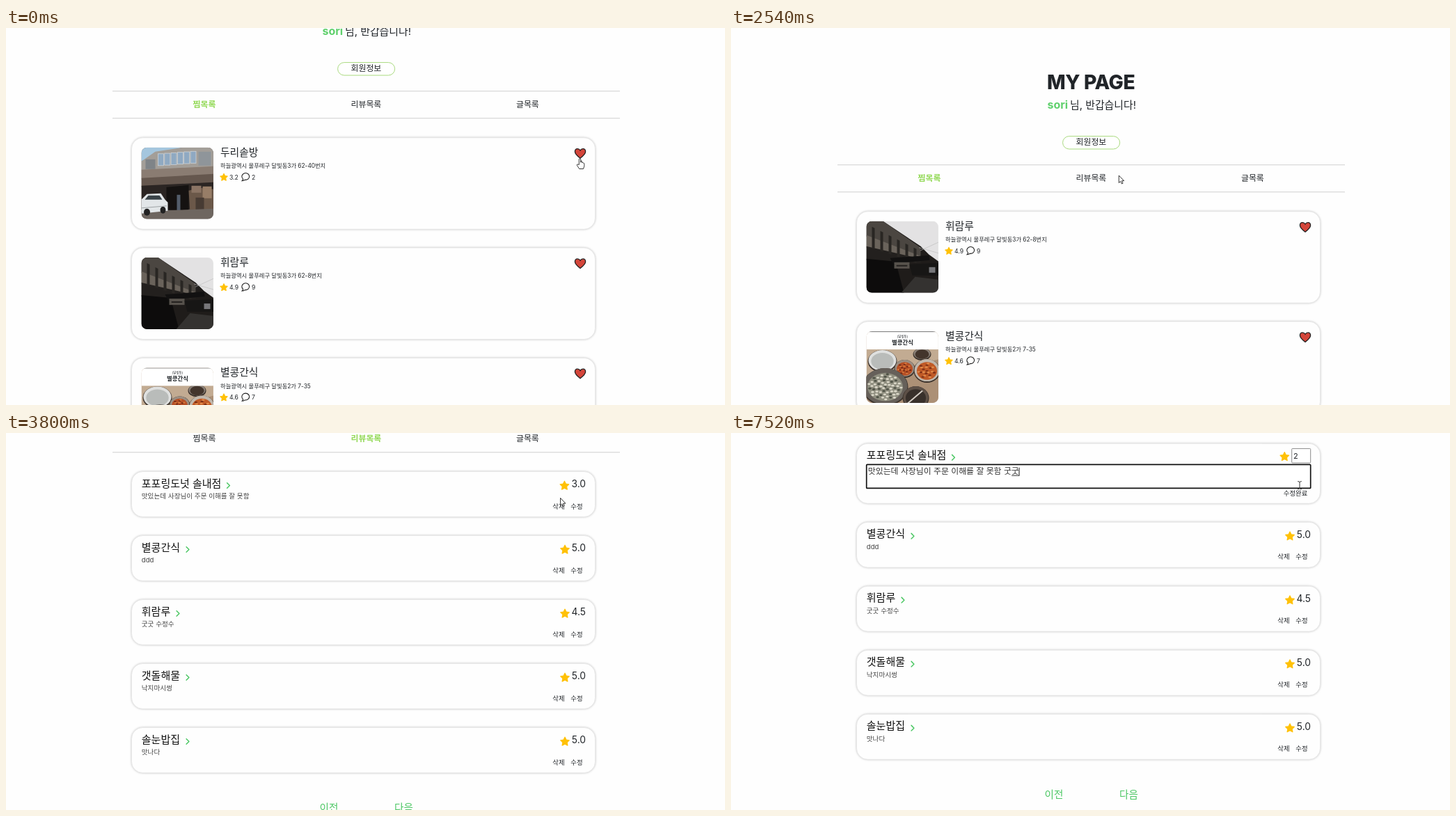
Recreate the animation shown at these times as an HTML page. Size 1033x542 px, loop 7990 ms.

```html
<!DOCTYPE html>
<html lang="ko">
<head>
<meta charset="utf-8">
<title>My page</title>
<style>
  html, body { margin: 0; width: 100%; height: 100%; overflow: hidden; background: #fefefe; }
  svg { display: block; width: 100%; height: 100%; }
  text { font-family: Inter, "Noto Sans CJK KR", "Noto Sans CJK", sans-serif; white-space: pre; }
  .card { fill: #fefefe; stroke: #e6e6e6; stroke-width: .7; filter: drop-shadow(.8px .8px 1.6px rgba(0,0,0,.25)); }
  .panel { fill: #fff; filter: drop-shadow(0 4px 6px rgba(0,0,0,.32)); }
</style>
</head>
<body>
<svg id="stage" viewBox="0 0 1033 542" xmlns="http://www.w3.org/2000/svg"></svg>
<script>
const LOOP = 7990, INK = '#212529', LIME = '#93d957', GREEN = '#4cc764', GOLD = '#ffc107';
const CARD_TOP = 263.8, LIKE_STEP = 158.3, REVIEW_STEP = 92, EDIT_EXTRA = 21;

const likes = [
  { name: '두리솥방', addr: '하늘광역시 물푸레구 달빛동3가 62-40번지', rate: '3.2', talk: 2, photo: street },
  { name: '휘람루', addr: '하늘광역시 물푸레구 달빛동3가 62-8번지', rate: '4.9', talk: 9, photo: alley },
  { name: '별콩간식', addr: '하늘광역시 물푸레구 달빛동2가 7-35', rate: '4.6', talk: 7, photo: food }
];
const reviews = [
  { name: '포포링도넛 솔내점', body: '맛있는데 사장님이 주문 이해를 잘 못함', rate: '3.0', arrow: 317 },
  { name: '별콩간식', body: 'ddd', rate: '5.0', arrow: 258.5 },
  { name: '휘람루', body: '굿굿 수정수', rate: '4.5', arrow: 244.5 },
  { name: '갯돌해물', body: '낙지마시썽', rate: '5.0', arrow: 258.5 },
  { name: '솔눈밥집', body: '맛나다', rate: '5.0', arrow: 258.5 }
];

// Markup helpers
const text = (x, y, s, size, o = {}) =>
  `<text x="${x}" y="${y}" font-size="${size}" fill="${o.fill || INK}" font-weight="${o.weight || 400}"` +
  ` text-anchor="${o.anchor || 'start'}" letter-spacing="${(o.track || 0) * size}"${o.id ? ` id="${o.id}"` : ''}>${s}</text>`;
const rect = (x, y, w, h, attrs) => `<rect x="${x}" y="${y}" width="${w}" height="${h}" ${attrs}/>`;
const shape = (points, fill) => `<polygon points="${points}" fill="${fill}"/>`;
const oval = (x, y, rx, ry, fill) => `<ellipse cx="${x}" cy="${y}" rx="${rx}" ry="${ry}" fill="${fill}"/>`;
const line = (d, color, width) =>
  `<path d="${d}" fill="none" stroke="${color}" stroke-width="${width}" stroke-linecap="round" stroke-linejoin="round"/>`;
const group = (id, inner) => `<g id="${id}">${inner}</g>`;

function star(x, y, r) {
  const pts = [];
  for (let i = 0; i < 10; i++) {
    const a = i * Math.PI / 5 - Math.PI / 2, k = i % 2 ? r * .5 : r;
    pts.push((x + k * Math.cos(a)).toFixed(2) + ',' + (y + k * Math.sin(a)).toFixed(2));
  }
  return `<polygon points="${pts.join(' ')}" fill="${GOLD}" stroke="${GOLD}" stroke-width="1.2" stroke-linejoin="round"/>`;
}

const heart = (x, y) =>
  `<path transform="translate(${x} ${y})" fill="#d4453a" stroke="#222" stroke-width="1.3"
    d="M0 7C-3 4.6-7.6 1.2-7.6-2.5-7.6-4.9-6-6.6-3.9-6.6-2.2-6.6-.8-5.7 0-4.2.8-5.7 2.2-6.6 3.9-6.6 6-6.6 7.6-4.9 7.6-2.5 7.6 1.2 3 4.6 0 7Z"/>`;

// Photos, drawn in a 104 x 103 box
function street() {
  let s = rect(0, 0, 104, 103, 'fill="#57504a"') + shape('0,0 60,0 20,9 0,20', '#a4c6de') +
    shape('0,20 20,6 60,0 104,0 104,38 0,44', '#a39e98') + shape('0,32 104,27 104,40 0,46', '#8a7c72') +
    shape('0,44 104,38 104,52 0,57', '#65574e') + shape('0,55 104,50 104,88 0,90', '#2b2523');
  for (let i = 0; i < 6; i++) s += rect(24 + i * 9.3, 9 - i * .7, 8, 17, 'fill="#8fa9c2" stroke="#ccd3d8" stroke-width=".8"');
  return s + rect(6, 17, 14, 14, 'fill="#7f8488"') + rect(82, 6, 18, 20, 'fill="#8f959a"') +
    shape('36,57 68,54 68,90 36,90', '#151211') + rect(51, 68, 5, 24, 'fill="#535d6b"') +
    shape('68,62 84,58 104,60 104,92 70,94', '#6b5849') + rect(72, 55, 14, 10, 'fill="#8b7464"') +
    rect(88, 56, 13, 17, 'fill="#977d67"') + rect(78, 72, 12, 20, 'fill="#473b33"') +
    shape('0,92 104,88 104,103 0,103', '#6e6660') +
    shape('0,75 8,67 28,66 34,75 38,79 38,91 0,95', '#e2e6e8') + shape('5,75 10,69 26,69 30,75', '#3a4348') +
    oval(8, 93, 4.5, 5, '#222') + oval(31, 90, 4, 5, '#222') + line('M0 87L36 84', '#9fa4a6', 1);
}
function alley() {
  let s = rect(0, 0, 104, 103, 'fill="#e3e2e3"') + shape('0,0 24,0 78,36 90,48 104,58 104,103 0,103', '#1f1c1a') +
    shape('0,0 24,0 78,38 78,50 0,22', '#4b4641') + shape('0,20 78,50 78,56 0,38', '#6a635b') +
    shape('0,36 78,54 78,60 0,56', '#23201e');
  for (let i = 0; i < 6; i++) s += shape(`${8 + i * 12},${8 + i * 6} ${12 + i * 12},${10 + i * 6} ${12 + i * 12},${40 + i * 4} ${8 + i * 12},${39 + i * 4}`, '#292623');
  return s + shape('0,54 42,58 54,103 0,103', '#0d0c0c') + shape('34,53 90,49 91,56 38,61', '#121111') +
    rect(40, 59, 22, 9, 'fill="#57524c"') + line('M44 64H58', '#24211f', 2) +
    shape('50,103 70,80 104,84 104,103', '#343230') + shape('62,62 104,60 104,78 66,78', '#171615') +
    line('M78 42L104 30M76 38L104 46', '#b9b9b9', .6) + rect(90, 66, 9, 8, 'fill="#77777a"');
}
function food() {
  const bowl = (x, y, rx, ry, rim, fill) => oval(x, y, rx, ry, '#3b322c') + oval(x, y - 1, rx - 1, ry - 1, rim) + oval(x, y, rx * .77, ry * .75, fill);
  let s = rect(0, 0, 104, 104, 'fill="#c2ab92"') + shape('0,68 104,40 104,104 0,104', '#ac9076') +
    bowl(80, 33, 13, 9, '#8b8178', '#43352c') + bowl(23, 43, 21, 16, '#dfe0df', '#b9bcba') +
    bowl(55, 54, 15, 13, '#9b8e82', '#b64f25') + bowl(87, 57, 19, 17, '#c1b7ac', '#c05a27') +
    bowl(27, 80, 33, 27, '#66605a', '#8f8e7f') + bowl(71, 96, 19, 17, '#5d5047', '#38302b');
  for (let i = 0; i < 60; i++) {
    const r = Math.sqrt(i / 60), x = Math.cos(i * 2.4) * r, y = Math.sin(i * 2.4) * r;
    s += oval(27 + 24 * x, 80 + 19 * y, 2.2, 1.4, i % 3 ? '#dad7c8' : '#4f5246');
    if (i % 3 === 0) s += oval(87 + 13 * x, 57 + 11 * y, 2.2, 1.2, i % 2 ? '#e08a4a' : '#7d2f16') +
      oval(55 + 10 * x, 54 + 8 * y, 1.8, 1.1, i % 2 ? '#d97a3c' : '#742a15');
  }
  return s + line('M60 103L80 86', '#d3ccc4', 2) + rect(0, 0, 104, 26, 'fill="#fff"') + rect(0, 0, 104, 1, 'fill="#777"') +
    text(52, 8.5, '(달빛동)', 4.6, { anchor: 'middle' }) +
    text(52, 19, '별콩간식', 8.4, { anchor: 'middle', weight: 700 });
}

function likeCard(c, i) {
  return group('like' + i,
    rect(180.5, 0, 666, 131.4, 'rx="16" class="card"') +
    `<g transform="translate(194.5 14)" clip-path="url(#round)">${c.photo()}</g>` +
    text(308, 26, c.name, 14.8, { weight: 300 }) +
    text(308, 43.2, c.addr, 8.3) +
    star(313, 57, 5.4) + text(321, 60, c.rate, 8.6) +
    `<path transform="translate(344 56)" fill="none" stroke="#222" stroke-width="1.1" d="M-3.4 3.3A5.4 4.9 0 1 1 -.6 4.5Q-2.6 5.9-4.8 5.9-3.4 4.7-3.4 3.3Z"/>` +
    text(353, 60, c.talk, 8.6) + heart(825, 22.4));
}

function reviewCard(c, i) {
  const view = text(194.8, 38.6, c.body, 9.6, { fill: '#444' }) +
    star(i ? 803 : 802.4, 20.3, 6.6) + text(833, 22.6, c.rate, 13.8, { anchor: 'end' }) +
    text(785.3, 53, '삭제', 9.4) + text(811.3, 53, '수정', 9.4);
  return group('review' + i,
    rect(180.5, 0, 666, 65, `rx="16" class="card" id="box${i}"`) +
    text(194.8, 22, c.name, 15, { fill: '#111' }) +
    line(`M${c.arrow + .6} 16.2l3.8 3.8-3.8 3.8`, GREEN, 1.5) +
    group('view' + i, view) + (i ? '' : group('edit', editForm())));
}

function editForm() {
  return star(795.3, 19, 6.6) +
    rect(805.7, 7.2, 27, 20.6, 'id="rateBox" fill="#fff" rx="1"') +
    group('spin', rect(822, 11.5, 9.5, 13, 'fill="#e6e6e6"') + shape('824.5,16.5 826.8,13.5 829.1,16.5', '#555') + shape('824.5,19.5 826.8,22.5 829.1,19.5', '#555')) +
    text(808, 22, '3.0', 11, { id: 'rate' }) +
    '<path id="rateCaret" d="M815.6 12.5v11.5" stroke="#222" stroke-width=".8"/>' +
    rect(194.7, 30.2, 638, 34, 'id="noteBox" fill="#fff" rx="1"') +
    text(196.8, 44.2, '', 11.9, { id: 'note', fill: '#333' }) +
    '<path id="noteCaret" stroke="#111"/><path id="compose" stroke="#333"/>' +
    text(793.8, 75, '수정완료', 9.4);
}

const tab = (id, x, s) => text(x, 220, s, 11.9, { id, anchor: 'middle' });
const header =
  text(517.2, 87.5, 'MY PAGE', 28.3, { weight: 800, anchor: 'middle', track: -.015 }) +
  text(454.5, 116.3, 'sori', 16, { weight: 700, fill: '#5fd06c' }) +
  text(487, 116.1, '님, 반갑습니다!', 14.9) +
  rect(476.6, 155.6, 82, 18.4, 'rx="9.2" fill="#fff" stroke="#a9da7e"') +
  text(517.4, 168.4, '회원정보', 11.9, { anchor: 'middle' }) +
  rect(153, 196, 729, 1.4, 'fill="#dcdcdc"') + rect(153, 235, 729, 1.4, 'fill="#dcdcdc"') +
  tab('tabLike', 285, '찜목록') + tab('tabReview', 517.4, '리뷰목록') + tab('tabPost', 749.4, '글목록');

const dialog = rect(364, -40, 305.5, 132.8, 'rx="8" class="panel"') +
  text(379.5, 13.6, '내용:', 12, { weight: 700 }) +
  text(379.5, 36.3, '찜 목록에서 삭제되었습니다.', 10.5, { fill: '#858585', track: .03 }) +
  rect(605.3, 51.4, 49.2, 26, 'rx="2" fill="#0aac8f"') +
  text(630, 68.6, '확인', 11, { fill: '#fff', weight: 700, anchor: 'middle' });

const pointer = 'fill="#fff" stroke="#222" stroke-width=".9" stroke-linejoin="round"';
const cursors =
  '<circle id="glow" cx="-2" cy="1" r="8.6" fill="#eee62a" fill-opacity=".78"/>' +
  group('arrow', `<path ${pointer} d="M0 0V10.6L2.4 8.4 4.1 12 5.8 11.2 4.2 7.7H7.4Z"/>`) +
  group('hand', `<path ${pointer} d="M-1.2 8.5V1Q-1.2-.3 0-.3T1.2 1V5.2Q2-.1 3.2 5.6 4.6 4.8 5 6.2 6.3 5.8 6.3 7.4V10.5L5 14.5H-.8L-4.2 9.3Q-4.4 7.6-2.8 8Z"/>`) +
  group('beam', line('M-2.4-5.4Q0-5.4 0-4.2 0-5.4 2.4-5.4M0-4.2V4.6M-2.4 5.6Q0 5.6 0 4.4 0 5.6 2.4 5.6', '#333', 1));

document.getElementById('stage').innerHTML =
  '<defs><clipPath id="round"><rect width="103.4" height="102.8" rx="8"/></clipPath></defs>' +
  group('page', header + group('likeList', likes.map(likeCard).join('')) +
    group('reviewList', reviews.map(reviewCard).join('') +
      group('pager', text(450.5, 0, '이전', 14.6, { fill: GREEN }) + text(558, 0, '다음', 14.6, { fill: GREEN })))) +
  group('dialog', dialog) + group('cursor', cursors);

const el = {};
document.querySelectorAll('[id]').forEach(n => el[n.id] = n);
const show = (id, on) => el[id].setAttribute('display', on ? 'inline' : 'none');
const move = (id, x, y) => el[id].setAttribute('transform', `translate(${x} ${y})`);
const set = (id, attrs) => { for (const k in attrs) el[id].setAttribute(k, attrs[k]); };

// Motion: [time, values...]
const scrollKeys = [[0, 106], [2129, 106], [2130, 0], [2990, 0], [3400, 91.7], [3730, 190], [3960, 248.3]];
const cursorKeys = [
  [260, 824.5, 188], [460, 493, 84], [1270, 493, 84], [1540, 641.5, 63.5], [2130, 641.5, 63.5],
  [2540, 557.5, 212], [2690, 524, 214], [2990, 524, 214], [3400, 685, 161], [3730, 786, 104],
  [4000, 826, 64], [4560, 827, 64], [4820, 828, 36.5], [6250, 828, 36.5], [6370, 817, 73], [6850, 817, 73], [7250, 817, 75]
];
const shapes = [[0, 'hand'], [300, 'arrow'], [2600, 'hand'], [3050, 'arrow'], [4000, 'hand'], [4280, 'beam'], [4690, 'arrow'], [6310, 'beam']];
const typed = [[0, ''], [6850, ' '], [6950, ' ㄱ'], [7050, ' 구'], [7150, ' 굿'], [7250, ' 굿ㄱ'], [7390, ' 굿구'], [7520, ' 굿굿']];
const rates = [[0, '3.0'], [5080, '2.5'], [5480, '2']];
const presses = [[5020, 5210], [5420, 5640], [6040, 6100]];

const latest = (keys, t) => keys.filter(k => k[0] <= t).pop()[1];
function track(keys, t) {
  let i = 0;
  while (i < keys.length - 1 && keys[i + 1][0] <= t) i++;
  const a = keys[i], b = keys[i + 1] || a;
  const p = b === a ? 0 : Math.max(0, (t - a[0]) / (b[0] - a[0]));
  return a.slice(1).map((v, n) => v + (b[n + 1] - v) * p);
}
const outline = (id, on) => set(id, { stroke: on ? '#111' : '#8a8a8a', 'stroke-width': on ? 1.7 : 1 });

function drawEdit(t) {
  const rateOn = t >= 5020 && t < 6510, noteOn = t >= 6510, extra = latest(typed, t);
  outline('rateBox', rateOn);
  outline('noteBox', noteOn);
  show('spin', t >= 4760 && t < 6310);
  el.rate.textContent = latest(rates, t);
  show('rateCaret', rateOn && t >= 5480);
  el.note.textContent = reviews[0].body + extra;
  show('noteCaret', noteOn);
  show('compose', extra.length > 1);
  if (noteOn) {
    const x = 197 + el.note.getComputedTextLength();
    set('noteCaret', { d: `M${x} 34.5V46.5` });
    set('compose', { d: `M${x - 10.8} 46H${x}` });
  }
}

function draw(t) {
  const removed = t >= 2130, onReviews = t >= 2800, editing = t >= 4280;
  move('page', 0, -track(scrollKeys, t)[0]);
  show('likeList', !onReviews);
  show('reviewList', onReviews);
  show('like0', !removed);
  likes.forEach((_, i) => move('like' + i, 0, CARD_TOP + (i - removed) * LIKE_STEP));
  [['tabLike', !onReviews], ['tabReview', onReviews]].forEach(([id, on]) =>
    set(id, { fill: on ? LIME : INK, 'font-weight': on ? 700 : 400 }));

  const extra = editing ? EDIT_EXTRA : 0;
  reviews.forEach((_, i) => move('review' + i, 0, CARD_TOP - .3 + i * REVIEW_STEP + (i ? extra : 0)));
  set('box0', { height: 65 + extra });
  move('pager', 0, CARD_TOP + 4 * REVIEW_STEP + 120.5 + extra);
  show('view0', !editing);
  show('edit', editing);
  if (editing) drawEdit(t);

  const p = Math.min(1, Math.max(0, (t - 850) / 220));
  show('dialog', t >= 850 && t < 1800);
  move('dialog', 0, -115 * (1 - p) ** 2);
  set('dialog', { opacity: Math.min(1, .3 + p) });

  move('cursor', ...track(cursorKeys, t));
  const kind = latest(shapes, t);
  ['arrow', 'hand', 'beam'].forEach(k => show(k, k === kind));
  show('glow', presses.some(([a, b]) => t >= a && t < b));
}

function tick(now) {
  draw(now % LOOP);
  requestAnimationFrame(tick);
}
draw(0);
requestAnimationFrame(tick);
</script>
</body>
</html>
```
